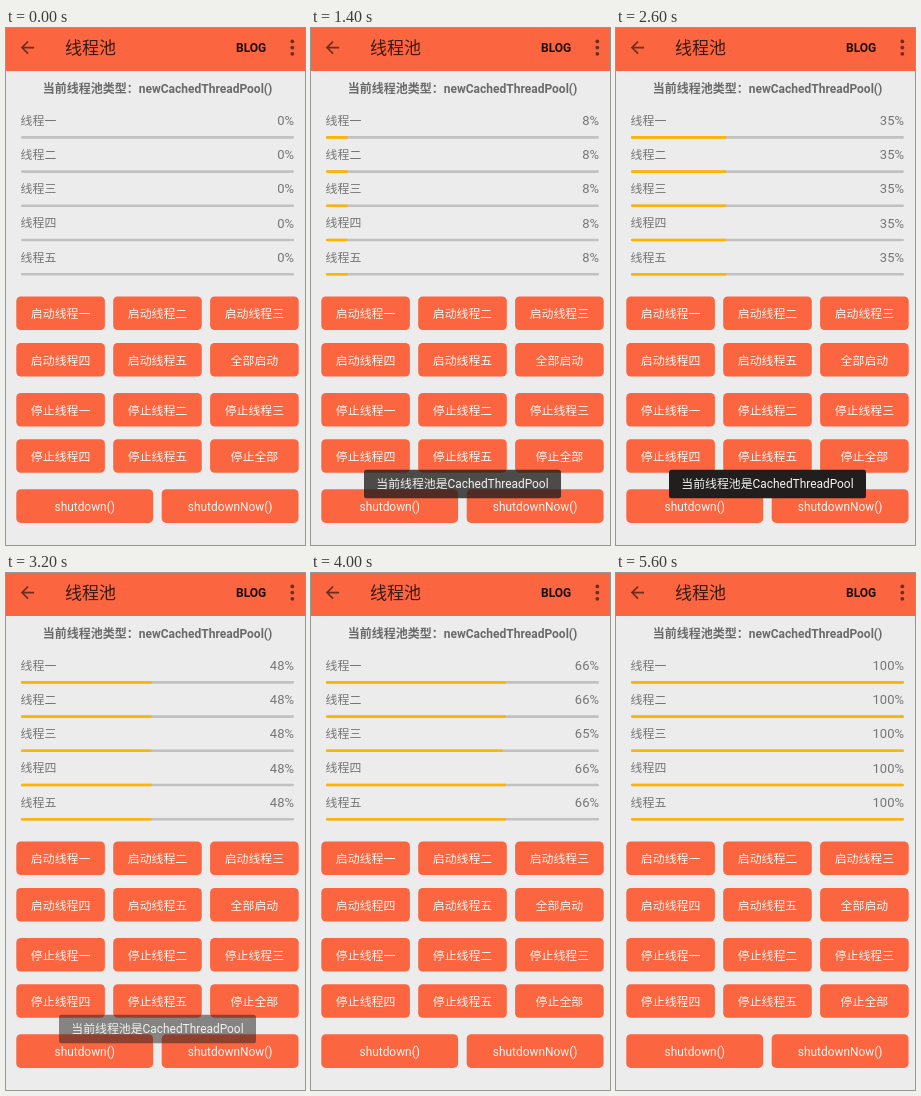
These frames come from a looping animation (299x517 px, 6000 ms). An HTML page:

```html
<!DOCTYPE html>
<html lang="zh-CN">
<head>
<meta charset="utf-8">
<title>线程池</title>
<style>
html, body { margin: 0; width: 100%; height: 100%; overflow: hidden; background: #ececec; }
svg { display: block; width: 299px; height: 517px; }
text { font-family: Roboto, "Noto Sans CJK SC", "Noto Sans CJK", "Noto Sans", sans-serif; font-size: 11.9px; }
.mid { text-anchor: middle; }
.end { text-anchor: end; }
</style>
</head>
<body>
<svg id="stage" viewBox="0 0 299 517" xmlns="http://www.w3.org/2000/svg"></svg>
<script>
const NS = "http://www.w3.org/2000/svg";
const stage = document.getElementById("stage");
const ORANGE = "#fb6540", BROWN = "#6c2e1f";
const LOOP = 6000, STEP = 100;
const LEFT = 15, WIDTH = 273;
// [time, value] points, linear in between
const PROGRESS = [[1020, 0], [1400, 8.4], [2600, 35.4], [3200, 48.4], [4000, 66.05], [4900, 85.4], [5600, 100.5]];
const TOAST = [[1100, 0], [1400, 0.78], [1500, 1], [3000, 1], [3200, 0.5], [3400, 0]];

function add(tag, attrs, parent = stage) {
  const el = document.createElementNS(NS, tag);
  for (const k in attrs) el.setAttribute(k, attrs[k]);
  parent.appendChild(el);
  return el;
}

function label(str, x, y, attrs = {}, parent = stage) {
  const el = add("text", { x, y, ...attrs }, parent);
  el.textContent = str;
  return el;
}

function box(x, y, width, height, rx, fill, parent) {
  return add("rect", { x, y, width, height, rx, fill }, parent);
}

function button(str, x, y, w) {
  box(x, y, w, 33.6, 4.5, ORANGE);
  label(str, x + w / 2, y + 21.7, { class: "mid", fill: "#fff4ef" });
}

function track(points, t) {
  if (t <= points[0][0]) return points[0][1];
  for (let i = 1; i < points.length; i++) {
    const [a, va] = points[i - 1], [b, vb] = points[i];
    if (t <= b) return va + (vb - va) * (t - a) / (b - a);
  }
  return points[points.length - 1][1];
}

// page and header
box(0, 0, 299, 517, 0, "#ececec");
box(0, 0, 299, 43, 0, ORANGE);
add("path", {
  d: "M20 11H7.83l5.59-5.59L12 4l-8 8 8 8 1.41-1.41L7.83 13H20z",
  transform: "translate(11.5 9.6) scale(.83)", fill: BROWN
});
label("线程池", 59, 25.8, { fill: "#3a1a12", style: "font-size:17px" });
label("BLOG", 230, 24, { fill: "#1f0d08", style: "font-size:12px;font-weight:700" });
for (const cy of [13.4, 19.6, 25.8]) add("circle", { cx: 286.3, cy, r: 1.9, fill: BROWN });
label("当前线程池类型：newCachedThreadPool()", 151.5, 64.8,
  { class: "mid", fill: "#6a6a6a", style: "font-size:12px;font-weight:700" });

// progress rows
const rows = [..."一二三四五"].map((n, i) => {
  const y = 96.7 + i * 34.2;
  label("线程" + n, 14.6, y, { fill: "#757575" });
  const value = label("0%", 288, y + 0.3, { class: "end", fill: "#757575", style: "font-size:13px" });
  box(LEFT, y + 11.4, WIDTH, 2.6, 1.3, "#c1c1c1");
  const bar = box(LEFT, y + 11.4, 0, 2.6, 1.3, "#ffb400");
  return { value, bar, lag: i === 2 ? 0.1 : 0 };
});

// buttons
[
  [268.5, "启动线程一", "启动线程二", "启动线程三"],
  [314.9, "启动线程四", "启动线程五", "全部启动"],
  [365, "停止线程一", "停止线程二", "停止线程三"],
  [411.2, "停止线程四", "停止线程五", "停止全部"]
].forEach(([y, ...names]) => names.forEach((s, i) => button(s, 10.3 + i * 96.9, y, 88.6)));
button("shutdown()", 10.3, 461.3, 136.8);
button("shutdownNow()", 155.7, 461.3, 136.8);

// toast
const toast = add("g", { opacity: 0 });
box(53, 441.8, 197, 28.4, 2.5, "#211e1d", toast);
label("当前线程池是CachedThreadPool", 151.4, 460.3, { class: "mid", fill: "#f4f4f4" }, toast);

function draw(ms) {
  const t = Math.floor((ms % LOOP) / STEP) * STEP;
  const p = track(PROGRESS, t);
  for (const { value, bar, lag } of rows) {
    const n = Math.max(0, Math.min(100, Math.floor(p - lag)));
    value.textContent = n + "%";
    bar.setAttribute("width", WIDTH * n / 100);
  }
  toast.setAttribute("opacity", track(TOAST, t));
}

const start = performance.now();
function tick() {
  draw(performance.now() - start);
  requestAnimationFrame(tick);
}
tick();
</script>
</body>
</html>
```
